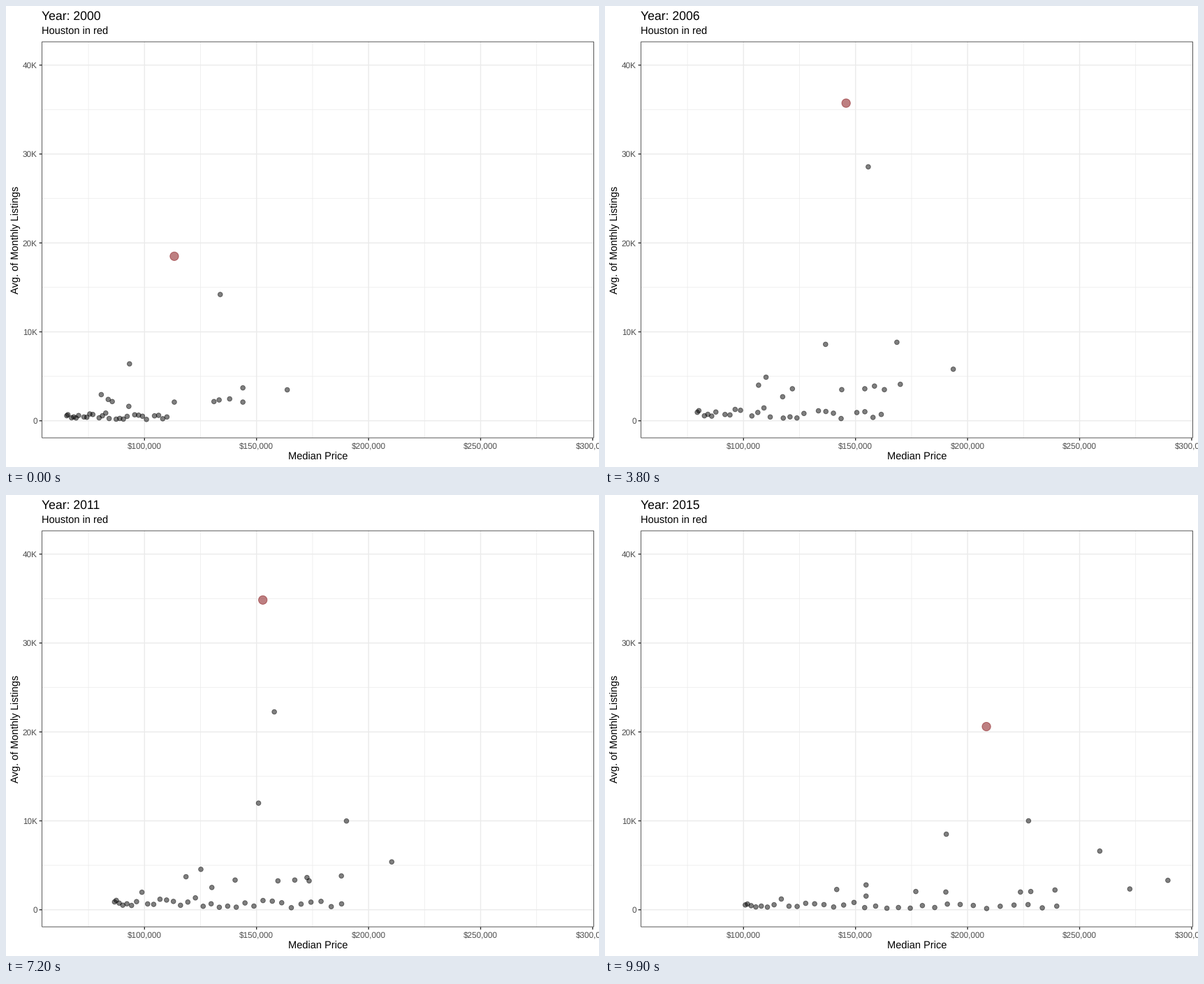
Animation, 849 px wide and 660 px high, one loop 10000 ms. Source, as a matplotlib script:

```python
import numpy as np
import matplotlib.pyplot as plt
from matplotlib.animation import FuncAnimation
from matplotlib.patches import Rectangle

W, H, DPI = 849, 660, 96
PX = 72 / DPI  # points per pixel
FRAMES, FIRST, LAST = 100, 2000, 2015
L, R, T, B = 51.3, 841.7, 50.9, 618.5  # plot panel

plt.rcParams["font.family"] = "Liberation Sans"
plt.rcParams["path.snap"] = False
plt.rcParams["text.hinting"] = "none"

# Shared market curves: price growth from 0 to 1, stock as a share of its peak
TURNS = [2000, 2003.3, 2005.8, 2008.5, 2010.9, 2012.7, 2015]
SUBURB_GROWTH = [0, .12, .24, .3, .37, .56, 1]
TOWN_GROWTH = [0, .2, .4, .55, .6, .72, 1]
STOCK = [.6, 1, 1, .96, .93, .62, .57]

# Cities with their own course: (year, price in $1000, listings in 1000)
CITIES = [
    [(2000, 133.8, 14.2), (2003.3, 148.3, 26.2), (2005.8, 155.8, 28.6),
     (2010.9, 157.8, 22.3), (2012.7, 183.1, 13.6), (2015, 227.2, 10)],
    [(2000, 93.3, 6.4), (2003.3, 114.6, 8.3), (2005.8, 137, 8.6),
     (2008.5, 147.4, 12.7), (2010.9, 150.8, 12), (2015, 190.5, 8.5)],
    [(2000, 143.9, 3.7), (2003.3, 153.8, 10.4), (2005.8, 168.7, 8.8),
     (2008.5, 186.3, 11.2), (2010.9, 190, 10), (2012.7, 215.2, 6.6),
     (2015, 259, 6.6)],
    # the highlighted city comes last
    [(2000, 113.3, 18.5), (2001, 120.8, 20), (2003.3, 133, 31.1),
     (2005.8, 146, 35.8), (2007, 150.4, 40.6), (2008.5, 150.6, 35.2),
     (2010.9, 152.7, 34.9), (2012.7, 173.6, 22.6), (2015, 208.4, 20.6)],
]

# Rows of (first price, last price, peak listings)
SUBURBS = np.array([(163.7, 289.4, 5.8), (131, 228.2, 3.6), (133.3, 239, 3.9),
                    (138, 272.4, 4.1), (143.9, 223.6, 3.5)])
MIDSIZE = np.array([(80.7, 154.7, 4.9), (83.8, 141.6, 4), (85.6, 176.9, 3.6),
                    (113.3, 190.3, 3.5), (93, 154.7, 2.7)])

# Small towns spread from cheap to dear, with more of them at the cheap end
rng = np.random.default_rng(7)
N_SMALL = 32
rank = np.linspace(0, 1, N_SMALL)
SMALL = np.column_stack([
    65.3 + 44.7 * rank ** 1.3,
    100.8 + 139 * rank ** 1.45,
    np.clip(rng.lognormal(np.log(.95), .6, N_SMALL), .25, 2.6),
])
JOINS_LATE = np.arange(N_SMALL) % 5 == 2
JOIN_YEAR = 2007


def group(rows, growth, year):
    first, last, peak = rows.T
    price = first + (last - first) * np.interp(year, TURNS, growth)
    return np.column_stack([price, peak * np.interp(year, TURNS, STOCK)])


def city(points, year):
    years, prices, listings = zip(*points)
    return np.interp(year, years, prices), np.interp(year, years, listings)


def to_stage(price, listings):
    return 198.3 + 3.208 * (price - 100), 593.8 - 12.73 * listings


def year_at(i):
    return FIRST + (LAST - FIRST) * i / (FRAMES - 1)


def positions(i):
    year = year_at(i)
    small = group(SMALL, TOWN_GROWTH, year)
    if year < JOIN_YEAR:
        small[JOINS_LATE] = -100  # off the stage
    data = np.vstack([small,
                      group(MIDSIZE, TOWN_GROWTH, year),
                      group(SUBURBS, SUBURB_GROWTH, year),
                      [city(c, year) for c in CITIES]])
    return np.column_stack(to_stage(*data.T))


fig = plt.figure(figsize=(W / DPI, H / DPI), dpi=DPI, facecolor="white")
ax = fig.add_axes([0, 0, 1, 1])
ax.set_xlim(0, W)
ax.set_ylim(H, 0)
ax.axis("off")


def line(x, y, color, width, z):
    ax.plot(x, y, color=color, lw=width * PX, zorder=z, solid_capstyle="butt")


def label(x, y, text, size, color="black", **kw):
    return ax.text(x, y, text, size=size, color=color, va="baseline", **kw)


GRID, DARK, GREY = "#EBEBEB", "#333333", "#4D4D4D"
for k in range(5):
    x, y = to_stage(100 + 50 * k, 10 * k)
    minor_x, minor_y = to_stage(75 + 50 * k, 10 * k + 5)
    line([minor_x] * 2, [T, B], GRID, .71, 1)
    if minor_y > T:
        line([L, R], [minor_y] * 2, GRID, .71, 1)
    line([x, x], [T, B], GRID, 1.42, 2)
    line([L, R], [y, y], GRID, 1.42, 2)
    line([x, x], [B, B + 3.67], DARK, 1.42, 4)
    line([L - 3.67, L], [y, y], DARK, 1.42, 4)
    label(x, 634, f"\\${100 + 50 * k},000", 8.8, GREY, ha="center")
    label(44.8, y + 4.2, f"{10 * k}K" if k else "0", 8.8, GREY, ha="right")

ax.add_patch(Rectangle((L + .3, T + .3), R - L - .6, B - T - .6, fill=False,
                       ec=DARK, lw=.8 * PX, zorder=4))
title = label(51, 20, "", 13.2)
label(51, 41, "Houston in red", 11)
label(446.5, 650, "Median Price", 11, ha="center")
label(18, 335, "Avg. of Monthly Listings", 11, ha="center",
      rotation=90, rotation_mode="anchor")

start = positions(0)
n = len(start)
sizes = [(6.63 * PX) ** 2] * (n - 1) + [(12.3 * PX) ** 2]
colors = [(0, 0, 0, .5)] * (n - 1) + [(.49, 0, .02, .5)]
dots = ax.scatter(start[:, 0], start[:, 1], s=sizes, facecolors=colors,
                  edgecolors=colors, linewidths=.945 * PX, zorder=3)


def draw(i):
    dots.set_offsets(positions(i))
    title.set_text(f"Year: {round(year_at(i))}")
    return dots, title


anim = FuncAnimation(fig, draw, frames=FRAMES, interval=100, repeat=True,
                     repeat_delay=0)
plt.show()
```
